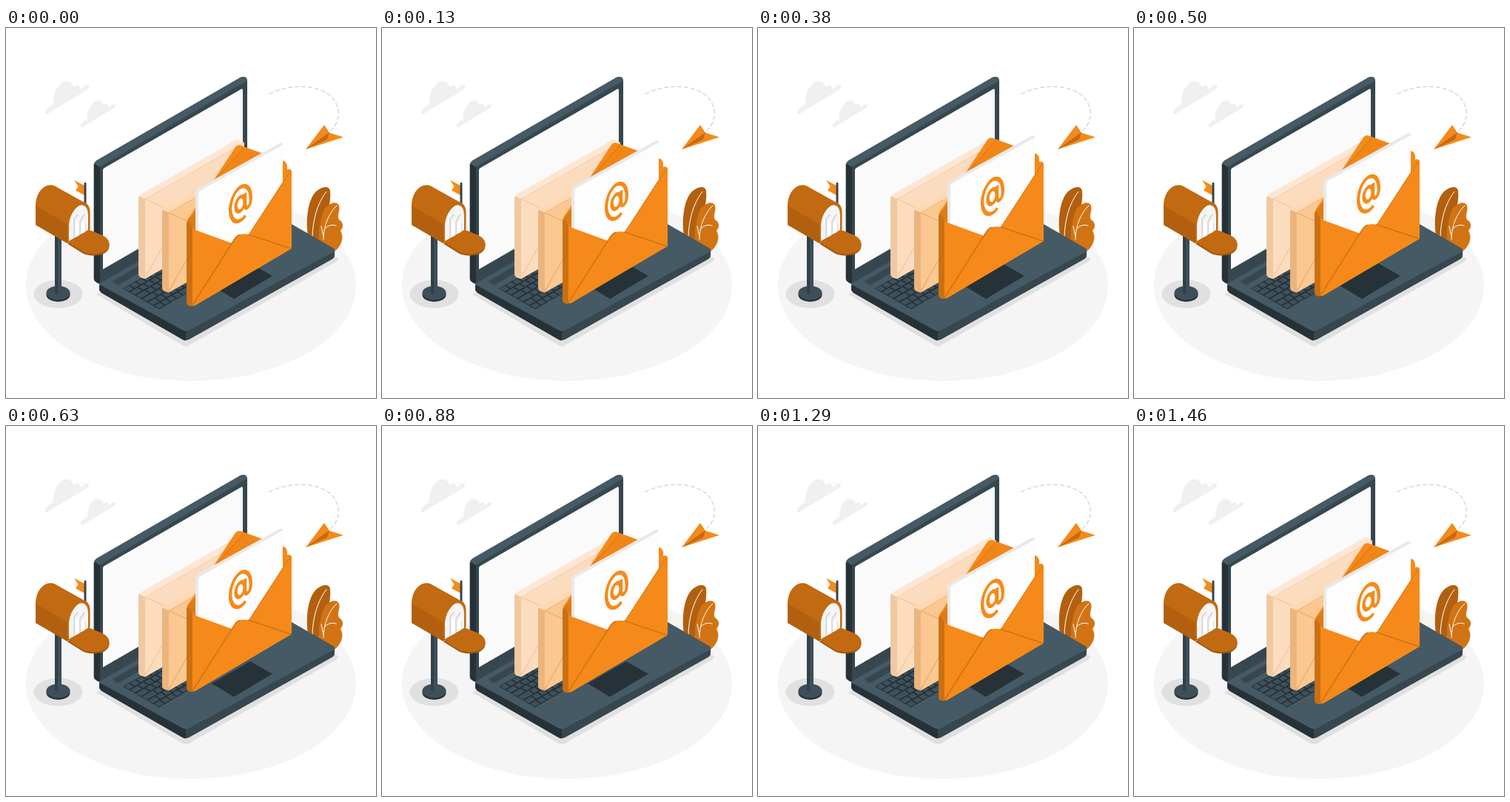
An HTML page with a canvas that plays this animation: 500x500 px, repeating every 1500 ms.

```html
<!DOCTYPE html>
<html lang="en">
<head>
<meta charset="utf-8">
<title>Incoming mail</title>
<style>
  html, body { margin: 0; width: 100%; height: 100%; overflow: hidden; background: #fff; }
  canvas { display: block; width: 500px; height: 500px; }
</style>
</head>
<body>
<canvas id="stage" width="500" height="500"></canvas>
<script>
const ctx = document.getElementById('stage').getContext('2d');

const ORANGE = '#f58a1a', BROWN = '#c16a11', DEEP = '#b2600f', SEAM = '#cf7312';
const SLATE = '#455a64', STEEL = '#37474f', INK = '#263238';
const LOOP = 1500, FRAMES = 36, LIFT = 20;

function fill(d, color) {
  ctx.fillStyle = color;
  ctx.fill(new Path2D(d));
}

function line(d, color, width = 1.2, dash = []) {
  ctx.strokeStyle = color;
  ctx.lineWidth = width;
  ctx.lineCap = 'round';
  ctx.lineJoin = 'round';
  ctx.setLineDash(dash);
  ctx.stroke(new Path2D(d));
}

function oval(x, y, rx, ry, color) {
  ctx.fillStyle = color;
  ctx.beginPath();
  ctx.ellipse(x, y, rx, ry, 0, 0, Math.PI * 2);
  ctx.fill();
}

function placed(x, y, scale, draw) {
  ctx.save();
  ctx.translate(x, y);
  ctx.scale(scale, scale);
  draw();
  ctx.restore();
}

// Origin: lower left end of the cloud
function cloud() {
  fill('M0 -3 Q1 -9 11 -14 Q10 -27 17 -37 Q22 -46 30 -45 Q37 -44 38 -37 ' +
       'Q43 -42 46 -38 Q48 -36 48 -34 Q53 -40 58 -40 Q60 -38 58 -34 L3 -1 Q0 1 0 -3Z', '#f0f0f0');
}

function plane() {
  line('M356 89 C386 74 424 77 440 93 C454 108 451 129 438 139', '#d9d9d9', 1.5, [5, 4]);
  fill('M405 164 L430 131 L437 141.5 L456 147.5Z', ORANGE);
  fill('M405 164 L437 141 L434 150.5Z', BROWN);
}

function plant() {
  fill('M413 300 C404 278 404 238 418 222 C427 213 437 213 438 220 C440 236 433 256 425 270 L422 300Z', DEEP);
  line('M414 284 C414 260 421 236 433 221', '#fff', 1);
  fill('M423 304 C421 282 424 256 431 244 C438 235 448 234 450 240 C452 248 447 252 450 259 ' +
       'C457 263 456 270 452 274 C458 284 452 296 444 302Z', '#d27414');
  line('M429 286 C429 268 436 250 447 240 M430 272 Q437 264 446 267 M429 282 L426 268', '#fff', 1);
}

function mailbox() {
  oval(70.5, 359.5, 33, 19, '#e0e0e0');
  oval(70.5, 360.5, 16, 9.5, INK);
  oval(70.5, 358, 16, 9.5, '#3d4f58');
  fill('M66 270 H75 V357 Q70.5 360 66 357Z', '#303f47');
  fill('M70 270 H75 V357 L70 358.5Z', '#3d4f58');

  fill('M92 205.5 L106 213 L107 226.5 L94 219.5 L97.5 214Z', ORANGE);
  fill('M40 266 V240 C40 223 52 208 66 213.5 L108 237 L83 291Z', BROWN);
  fill('M40 240 L83 265 V291 L40 266Z', DEEP);
  line('M107 210 V238', STEEL, 3);

  fill('M83 290 V266 C84 245 98 232 107 236 C113 239 114 246 113.5 254 V272Z', BROWN);
  fill('M85 288 V267 C86 250 98 236 105 240 C110 242 111 248 111 255 V273Z', '#f5f5f5');
  line('M92 284 V258 L97 252 M100 280 V261 L106 252 M107 276 V264', '#cfcfcf', 1.4);
  fill('M94 285 V262 L99 258 V282Z M102 280 V264 L107 260 V277Z', '#fff');

  const door = 'M83 289.5 L112 272.5 L130 280 C143 286 142 298 132 303 C122 307 109 306 103 302Z';
  placed(0, 2, 1, () => fill(door, '#9c530b'));
  fill(door, BROWN);
}

function screen() {
  fill('M118.8 186 Q119 181 123 178.8 L317 66.8 Q326 64 326 72 V232 L127 346 Q119 343 118.8 339Z', STEEL);
  fill('M118.8 183 L127 188 V346 Q119 343 118.8 339Z', INK);
  fill('M119 183.5 Q119.5 181 123 178.8 L317 66.8 Q324 64.5 326 71 L127 187.5Z', SLATE);
  fill('M131 192 Q131 190 133 189 L318 82.5 Q320 81.5 320 84 V217 L131 326Z', '#fafafa');
}

function keyboard() {
  const rows = 6, pitch = 9.4, length = 140;
  ctx.save();
  ctx.transform(0.866, -0.5, 0.866, 0.5, 158, 352);
  ctx.fillStyle = INK;
  ctx.fillRect(0, 0, length, rows * pitch);
  ctx.fillStyle = '#3f515a';
  for (let row = 0; row < rows; row++) {
    const first = [9.4, 13, 15, 18, 12, 10][row];
    for (let x = 1, w = first; x < length - 2; x += w, w = row === 5 && x > 30 && x < 40 ? 50 : pitch) {
      ctx.fillRect(x, row * pitch + 1, Math.min(w, length - x) - 2, pitch - 2.2);
    }
  }
  ctx.restore();
}

function base() {
  fill('M129 344 L327 231 L444 300 V308 Q444 311 438 314 L249 420 Q243 424 237 420 L131 359 Q126 356 126 353 V347Z', STEEL);
  fill('M126 347 L243 409 V422.5 Q240 422 237 420 L131 359 Q126 356 126 353Z', INK);
  fill('M129 343.5 L327 231 L438 295 Q450 300 438 305 L249 407.5 Q243 411.5 237 407.5 L131 349 Q123 346 129 343.5Z', SLATE);
  fill('M144 342 L200 310 L206 316 L151 348Z', STEEL);
  keyboard();
  fill('M278 348 L330 318 L360 335 L308 366Z', INK);
}

// x, y: upper left corner of the front face
function closedEnvelope(x, y, width, [face, side, top, seam]) {
  const rise = width * 0.567;
  placed(x, y, 1, () => {
    fill(`M-9 -2 Q-9 -5 -6 -6.5 L${width - 9} ${-rise - 5} L${width} ${-rise} L0 0Z`, top);
    fill('M-9 -4 L0 0 H1 V108 Q-9 107 -9 102Z', side);
    fill(`M0 0 L${width} ${-rise} V${108 - rise} L0 108Z`, face);
    line('M0 0 L67 31 M0 106 L50 18', seam);
    line(`M0 0 L${width} ${-rise}`, seam, 0.8);
  });
}

// Isometric sign: bowl, stem hooking into an open ring
function atSign() {
  ctx.save();
  ctx.transform(0.866, -0.5, 0, 1, 317, 237.5);
  ctx.strokeStyle = ORANGE;
  ctx.lineWidth = 5;
  ctx.lineCap = 'butt';
  ctx.lineJoin = 'round';
  ctx.setLineDash([]);
  ctx.beginPath();
  ctx.ellipse(0, 0, 16, 22.5, 0, Math.PI * 0.34, Math.PI * 2);
  ctx.bezierCurveTo(16, 13, 7, 13, 7, 5);
  ctx.lineTo(7, -11);
  ctx.stroke();
  ctx.beginPath();
  ctx.ellipse(-0.5, 0, 7, 9.5, 0, 0, Math.PI * 2);
  ctx.stroke();
  ctx.restore();
}

function openEnvelope() {
  // Back panel with raised flap
  fill('M244 266 Q244 260 248 255 L310 161 Q313 157 318 159 L376 180 Q380 182 380 188 V191 Q386 189 386 196 L374 214 L252 277Z', ORANGE);
  fill('M252 268 L284 204 L322 162 L374 181 V200Z', '#f08617');
  line('M284 204 L321 162.5', SEAM, 1);
  fill('M244 266 Q244 260 249 256 L257 247 V275 L252 268Z', '#dd7c15');
  fill('M244 265 Q244 262 247 262 L252 269 V376 Q244 376 244 371Z', '#cb7013');

  // Letter
  fill('M256 222 Q256 218.5 259 217 L370 155.5 Q374 154 374 159 V260 L320 300 L256 276Z', '#e9e9e9');
  fill('M260 224 Q260 221.5 262 220 L374 158 V260 L320 300 L260 278Z', '#fdfdfd');
  atSign();

  // Pocket
  fill('M252 271.5 L307 291.5 H320 L383 194 Q386 190 386 195 V296 Q386 298 384 299 L257 374 Q252 377.5 252 373Z', ORANGE);
  fill('M252 374 L309 285 Q313 278.5 320 278.5 Q324 278 328 279 L386 298 L257 374Z', ORANGE);
  line('M253 373 L309 285 Q312 280.5 316 279.5 M328 279 L385 298', SEAM, 1.6);
  line('M329 278 L384 194', SEAM, 0.9);
}

function draw(time) {
  // Steps of 24 per second, sampled mid-step
  const step = Math.floor((time % LOOP + 5) * FRAMES / LOOP) % FRAMES;
  const phase = (step + 0.5) / FRAMES;
  const lift = LIFT * (1 - Math.abs(1 - 2 * phase));

  ctx.fillStyle = '#fff';
  ctx.fillRect(0, 0, 500, 500);
  oval(250, 348, 223, 129, '#f5f5f5');
  placed(53, 117, 1, cloud);
  placed(101, 134.5, 0.8, cloud);
  plane();
  fill('M122 360 L237 428 Q243 432 249 428 L446 316 Q452 312 446 309 L243 300Z', '#e0e0e0');
  plant();
  screen();
  base();
  mailbox();
  closedEnvelope(188, 231, 134, ['#fcdcbe', '#f1c9a1', '#fde7d4', '#f0c598']);
  closedEnvelope(220, 249.5, 110, ['#fbc892', '#ebb47c', '#fdd9b5', '#e6aa68']);
  placed(0, 0.55 - lift, 1, openEnvelope);
}

const start = performance.now();
function tick() {
  draw(performance.now() - start);
  requestAnimationFrame(tick);
}
tick();
</script>
</body>
</html>
```
